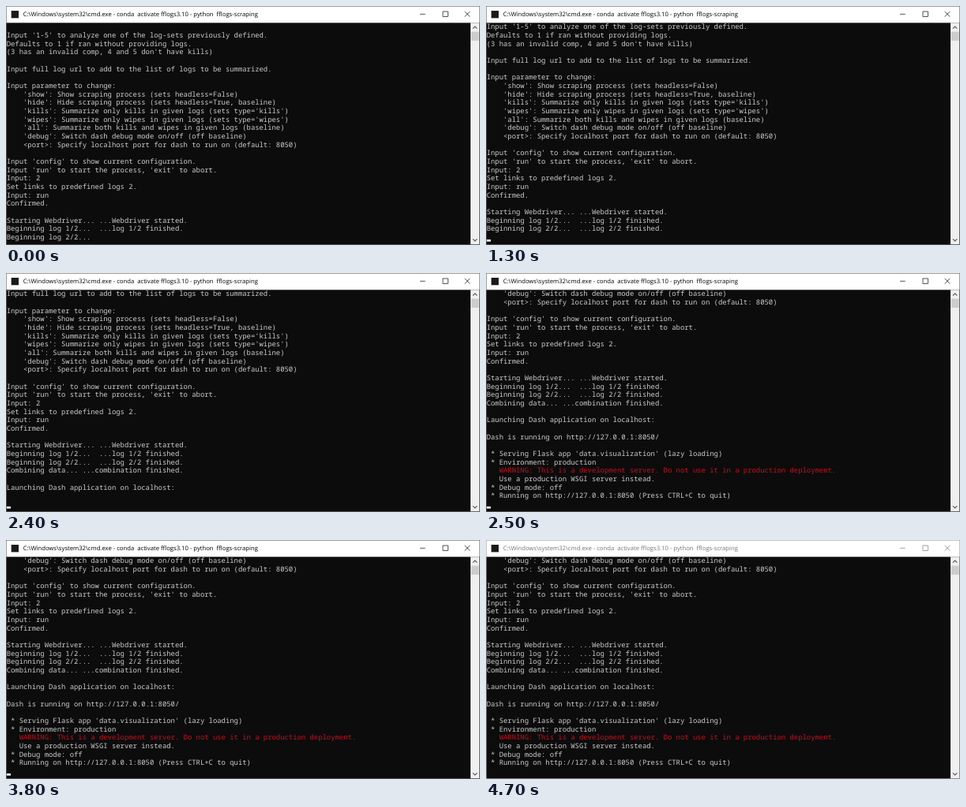
An HTML page with a canvas for the animation above (4800 ms loop, 600 by 303 pixels).

```html
<!DOCTYPE html>
<html lang="en">
<head>
<meta charset="utf-8">
<title>Console session</title>
<style>
html, body { margin: 0; width: 100%; height: 100%; overflow: hidden; background: #0c0c0c; }
canvas { display: block; width: 600px; height: 303px; }
</style>
</head>
<body>
<canvas id="stage" width="600" height="303"></canvas>
<script>
const ctx = document.getElementById('stage').getContext('2d');

// The window is laid out at 900 px wide and drawn at two thirds.
const SCALE = 2 / 3, W = 900, H = 454.5;
const LOOP = 4800, ROWS = 26, CELL_W = 8, CELL_H = 16, TOP = 32, LEFT = 1;
const BLUR_AT = 4600;
const TITLE = 'C:\\Windows\\system32\\cmd.exe - conda  activate fflogs3.10 - python  fflogs-scraping';
const PENDING = 'Beginning log 2/2...  ';

const LINES = `
Input '1-5' to analyze one of the log-sets previously defined.
Defaults to 1 if ran without providing logs.
(3 has an invalid comp, 4 and 5 don't have kills)

Input full log url to add to the list of logs to be summarized.

Input parameter to change:
    'show': Show scraping process (sets headless=False)
    'hide': Hide scraping process (sets headless=True, baseline)
    'kills': Summarize only kills in given logs (sets type='kills')
    'wipes': Summarize only wipes in given logs (sets type='wipes')
    'all': Summarize both kills and wipes in given logs (baseline)
    'debug': Switch dash debug mode on/off (off baseline)
    <port>: Specify localhost port for dash to run on (default: 8050)

Input 'config' to show current configuration.
Input 'run' to start the process, 'exit' to abort.
Input: 2
Set links to predefined logs 2.
Input: run
Confirmed.

Starting Webdriver... ...Webdriver started.
Beginning log 1/2...  ...log 1/2 finished.
${PENDING}...log 2/2 finished.
Combining data... ...combination finished.

Launching Dash application on localhost:

Dash is running on http://127.0.0.1:8050/

 * Serving Flask app 'data.visualization' (lazy loading)
 * Environment: production
   WARNING: This is a development server. Do not use it in a production deployment.
   Use a production WSGI server instead.
 * Debug mode: off
 * Running on http://127.0.0.1:8050 (Press CTRL+C to quit)`.split('\n');

// Time of each burst of output and the line the cursor ends on.
const OUTPUT = [[0, 25], [1300, 26], [2400, 30], [2500, 38]];
const CURSOR_ON = [[600, 1100], [1300, 1600], [2200, 3200], [3800, 4300]];

function rect(color, x, y, w, h) {
  ctx.fillStyle = color;
  ctx.fillRect(x, y, w, h);
}

function path(color, width, ...segments) {
  ctx.strokeStyle = color;
  ctx.lineWidth = width;
  ctx.beginPath();
  for (const [x, y, ...rest] of segments) {
    ctx.moveTo(x, y);
    for (let i = 0; i < rest.length; i += 2) ctx.lineTo(rest[i], rest[i + 1]);
  }
  ctx.stroke();
}

function drawTitleBar(active) {
  const ink = active ? '#000' : '#777';
  rect('#fff', 0, 0, W, TOP);
  rect('#1a1a1a', 10, 9, 14, 14);
  ctx.fillStyle = ink;
  ctx.font = '11.54px "Open Sans", sans-serif';
  ctx.fillText(TITLE, 32.5, 19.5);

  const y = 15.5;
  path(ink, 1, [786, y, 796, y]);
  ctx.strokeRect(829.5, y - 5, 9.5, 9.5);
  path(ink, 1.1, [871, y - 5, 881, y + 5], [881, y - 5, 871, y + 5]);
}

function drawScrollBar() {
  const x = 882, mid = 890.5;
  rect('#f0f0f0', x, TOP, 17, H - TOP - 1);
  rect('#cdcdcd', x + 1, 49, 15, 17);
  path('#555', 1.6,
    [mid - 4, 43, mid, 39, mid + 4, 43],
    [mid - 4, 443, mid, 447, mid + 4, 443]);
}

function drawConsole(t) {
  const last = OUTPUT.filter(([at]) => at <= t).pop()[1];
  const first = last - ROWS + 1;
  const waiting = last === OUTPUT[0][1];
  ctx.font = '13.3333px "Noto Sans Mono", monospace';
  for (let row = 0; row < ROWS; row++) {
    const index = first + row;
    if (index === last && !waiting) break;
    const text = index === last ? PENDING : LINES[index];
    ctx.fillStyle = text.includes('WARNING') ? '#c50f1f' : '#ccc';
    ctx.fillText(text, LEFT, TOP + row * CELL_H + 12);
  }
  if (CURSOR_ON.some(([on, off]) => t >= on && t < off)) {
    const column = waiting ? PENDING.length : 0;
    rect('#f2f2f2', LEFT + column * CELL_W, TOP + ROWS * CELL_H - 4, CELL_W, 4);
  }
}

function draw(t) {
  const active = t < BLUR_AT;
  ctx.setTransform(SCALE, 0, 0, SCALE, 0, 0);
  ctx.textRendering = 'geometricPrecision';
  rect('#0c0c0c', 0, 0, W, H);
  drawConsole(t);
  drawTitleBar(active);
  drawScrollBar();
  ctx.strokeStyle = active ? '#707070' : '#aaa';
  ctx.lineWidth = 1;
  ctx.strokeRect(0.5, 0.5, W - 1, H - 1);
}

const start = performance.now();
function tick() {
  draw((performance.now() - start) % LOOP);
  requestAnimationFrame(tick);
}
tick();
</script>
</body>
</html>
```
